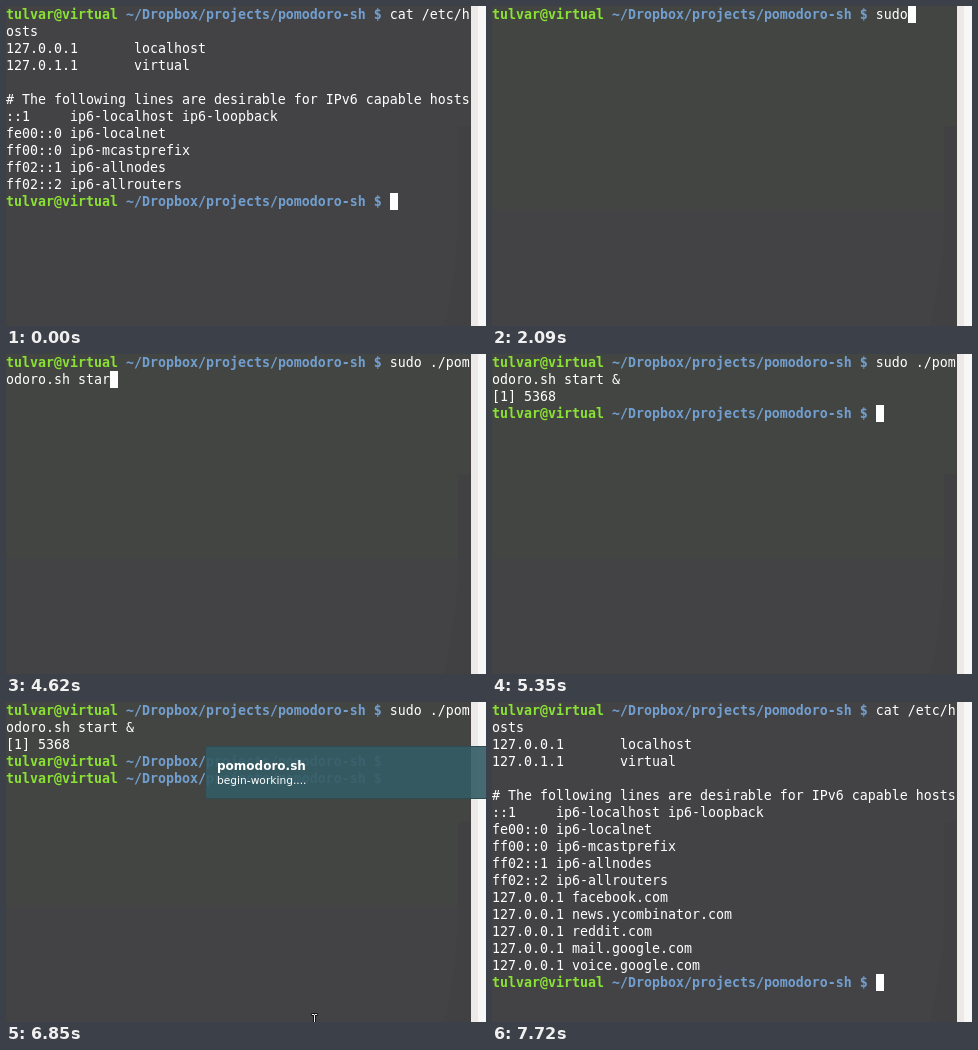
Recreate the animation shown at these times as an HTML page. Size 480 by 320 pixels, loop 8000 ms.

```html
<!DOCTYPE html>
<html lang="en">
<head>
<meta charset="utf-8">
<title>Terminal session</title>
<style>
  html, body { margin: 0; width: 100%; height: 100%; overflow: hidden; background: #434345; }
  svg { display: block; width: 480px; height: 320px; }
  text { white-space: pre; fill: #fff; }
  #rows text { font: 13.29px "DejaVu Sans Mono", monospace; }
  #rows .user { fill: #8ae234; font-weight: bold; }
  #rows .path { fill: #729fcf; font-weight: bold; }
  #note text { font: 10.67px "DejaVu Sans", sans-serif; }
  #note .title { font-size: 12px; font-weight: bold; }
</style>
</head>
<body>
<svg viewBox="0 0 480 320">
  <rect width="480" height="320" fill="#434345"/>
  <rect id="tint" width="463" height="204" fill="#434542"/>
  <path d="M452 120V220Q450 270 438 320H465V120Z" fill="#414143"/>
  <rect x="465" width="7" height="320" fill="#ece9e7"/>
  <rect x="472" width="8" height="320" fill="#f8f7f7"/>
  <g id="rows"></g>
  <rect id="caret" width="8" height="17" fill="#fff"/>
  <text id="under" font-size="13.29" font-family="DejaVu Sans Mono, monospace" style="fill:#434345"></text>
  <g id="note">
    <rect x="199.5" y="44.5" width="290" height="52" rx="2" fill="#345b64" fill-opacity=".9" stroke="#2c4b53"/>
    <text class="title" x="211" y="68">pomodoro.sh</text>
    <text x="211" y="82">begin-working....</text>
  </g>
  <g id="mouse" fill="none">
    <path d="M305.5 312.5H311.5M308.5 312V320" stroke="#111" stroke-width="3"/>
    <path d="M306 312.5H308L308.5 313L309 312.5H311M308.5 313V320" stroke="#eee"/>
  </g>
</svg>
<script>
const LOOP = 8000, CELL = 8, ROW = 17, COLS = 58;
const USER = "tulvar@virtual", PATH = "~/Dropbox/projects/pomodoro-sh $";
const get = id => document.getElementById(id);

// A leading ">" marks a line that starts with the prompt.
const hosts = [
  ">cat /etc/hosts",
  "127.0.0.1       localhost",
  "127.0.1.1       virtual",
  "",
  "# The following lines are desirable for IPv6 capable hosts",
  "::1     ip6-localhost ip6-loopback",
  "fe00::0 ip6-localnet",
  "ff00::0 ip6-mcastprefix",
  "ff02::1 ip6-allnodes",
  "ff02::2 ip6-allrouters"
];
const blocked = ["facebook.com", "news.ycombinator.com", "reddit.com", "mail.google.com", "voice.google.com"]
  .map(site => "127.0.0.1 " + site);
const run = "sudo ./pomodoro.sh start &";
const started = [">" + run, "[1] 5368", ">"];

const steps = [];
const add = (time, lines, caret = true) => steps.push({ time, lines, caret });
const type = (before, text, keys) =>
  keys.forEach(([time, count]) => add(time, [...before, ">" + text.slice(0, count)]));

add(0, [...hosts, ">"]);
add(590, [...hosts, ">"], false);
type(hosts, "clear", [[1190, 1], [1340, 3], [1490, 5]]);
add(1640, [">"]);
type([], run, [[1940, 2], [2090, 4], [2240, 5], [2390, 6], [2530, 7],
  [2830, 8], [2980, 9], [3130, 10], [3280, 19]]);
add(3730, [">" + run.slice(0, 19)], false);
type([], run, [[3880, 20], [4170, 21], [4470, 22], [4620, 23], [4770, 24], [4910, 25], [5060, 26]]);
add(5350, started);
add(5950, started, false);
add(6250, [...started, ">"]);
add(6850, [...started, ">"], false);
add(7440, [...started, ">"]);
add(7580, [hosts[0]]);
add(7720, [...hosts, ...blocked, ">"]);

const span = (cls, text) => `<tspan class="${cls}">${text}</tspan>`;
const escape = text => text.replace(/&/g, "&amp;");

function markup(row) {
  if (!row.startsWith(USER)) return escape(row);
  const rest = row.slice(USER.length + PATH.length + 1);
  return span("user", USER) + " " + span("path", PATH) + escape(rest);
}

function wrap(lines) {
  return lines.flatMap(line => {
    const full = line[0] === ">" ? `${USER} ${PATH} ${line.slice(1)}` : line;
    const parts = [];
    for (let i = 0; i === 0 || i < full.length; i += COLS) parts.push(full.slice(i, i + COLS));
    return parts;
  });
}

function drawScreen({ lines, caret }) {
  const rows = wrap(lines);
  get("rows").innerHTML = rows
    .map((row, i) => `<text x="0" y="${i * ROW + 13}">${markup(row)}</text>`).join("");
  const last = rows.length - 1, col = Math.min(rows[last].length, COLS - 1);
  const x = col * CELL, y = last * ROW;
  get("caret").setAttribute("x", x);
  get("caret").setAttribute("y", y);
  get("caret").style.display = caret ? "" : "none";
  get("under").setAttribute("x", x);
  get("under").setAttribute("y", y + 13);
  get("under").textContent = caret ? rows[last][col] || "" : "";
}

const show = (id, on) => { get(id).style.display = on ? "" : "none"; };
let shown = null;

function draw(t) {
  const step = steps.findLast(s => s.time <= t);
  if (step !== shown) drawScreen(shown = step);
  show("tint", t >= 1640 && t < 7580);
  show("note", t >= 5500 && t < 7580);
  get("note").setAttribute("opacity", t < 5650 ? 0.5 : 1);
  show("mouse", t >= 6850 && t < 7000);
}

const begin = performance.now();
function tick() {
  draw((performance.now() - begin) % LOOP);
  requestAnimationFrame(tick);
}
tick();
</script>
</body>
</html>
```
